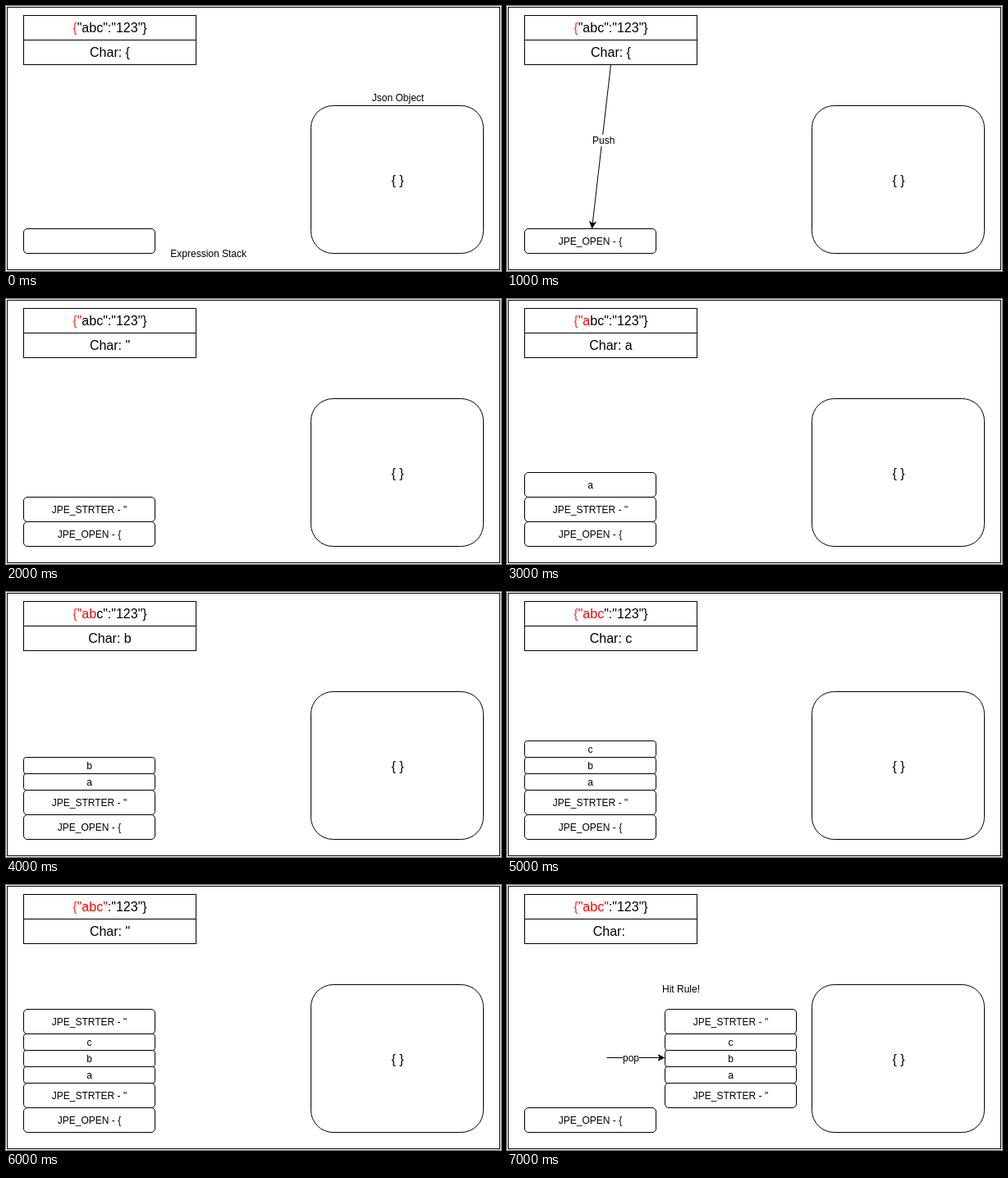
An HTML page for the animation above (8 s loop, 603 px wide and 323 px high).

```html
<!DOCTYPE html>
<html lang="en">
<head>
<meta charset="utf-8">
<title>Parser stack</title>
<style>
  html, body { margin: 0; width: 100%; height: 100%; overflow: hidden; background: #fff; }
  svg { display: block; }
  rect { fill: #fff; stroke: #000; }
  rect.gap { stroke: none; }
  line { stroke: #000; }
  text { font-family: "Liberation Sans", Helvetica, Arial, sans-serif; text-anchor: middle; }
</style>
</head>
<body>
<svg width="603" height="323" viewBox="0 0 603 323">
  <defs>
    <marker id="head" markerUnits="userSpaceOnUse" orient="auto" overflow="visible">
      <path d="M0 0L-7 3.5L-5.25 0L-7 -3.5Z" stroke="#000"/>
    </marker>
  </defs>
  <rect x="1.5" y="1.5" width="600" height="320"/>
  <g id="scene"></g>
</svg>
<script>
const STEP = 1000;
const SOURCE = '{"abc":"123"}';
const OPEN = ['JPE_OPEN - {', 30];
const QUOTE = ['JPE_STRTER - "', 30];
const letters = s => [...s].map(c => [c, 20]);

// read: characters consumed; stack: [label, height] from the bottom up
const steps = [
  { read: 1, char: '{', stack: [['', 30]], intro: true },
  { read: 1, char: '{', stack: [OPEN], push: true },
  { read: 2, char: '"', stack: [OPEN, QUOTE] },
  { read: 3, char: 'a', stack: [OPEN, QUOTE, ['a', 30]] },
  { read: 4, char: 'b', stack: [OPEN, QUOTE, ...letters('ab')] },
  { read: 5, char: 'c', stack: [OPEN, QUOTE, ...letters('abc')] },
  { read: 6, char: '"', stack: [OPEN, QUOTE, ...letters('abc'), QUOTE] },
  { read: 6, char: '', stack: [OPEN], popped: [QUOTE, ...letters('abc'), QUOTE] },
];

const text = (x, y, s, size = 12) => `<text x="${x}" y="${y}" font-size="${size}">${s}</text>`;

const box = (x, y, w, h, r = 0) =>
  `<rect x="${x}" y="${y}" width="${w}" height="${h}" rx="${r}"/>`;

const arrow = (x1, y1, x2, y2, label, lx, ly, w) =>
  `<line x1="${x1}" y1="${y1}" x2="${x2}" y2="${y2}" marker-end="url(#head)"/>` +
  `<rect class="gap" x="${lx - w / 2}" y="${ly - 11}" width="${w}" height="14"/>` +
  text(lx, ly, label);

function pile(x, bottom, items) {
  return items.map(([label, h]) => {
    bottom -= h;
    return box(x, bottom, 160, h, h * 0.15) + text(x + 80, bottom + h / 2 + 4.5, label);
  }).join('');
}

function header({ read, char }) {
  const code = `<tspan fill="#f33">${SOURCE[0]}</tspan>` +
    `<tspan fill="red">${SOURCE.slice(1, read)}</tspan>${SOURCE.slice(read)}`;
  return box(21.5, 11.5, 210, 30) + box(21.5, 41.5, 210, 30) +
    text(126.5, 32, code, 16) + text(126.5, 62, 'Char:\u00a0' + char, 16);
}

function draw(step) {
  let out = header(step) + box(371.5, 121.5, 210, 180, 27) +
    text(477, 218, '{ }', 16) + pile(21.5, 301.5, step.stack);
  if (step.intro) out += text(477.5, 116, 'Json Object') + text(246.7, 306, 'Expression Stack');
  if (step.push) out += arrow(126.5, 71.5, 103.6, 270.4, 'Push', 117.7, 168, 28);
  if (step.popped) {
    out += pile(192.5, 271.5, step.popped) + text(212, 131, 'Hit Rule!') +
      arrow(121.5, 210.5, 191.4, 210.5, 'pop', 151, 215, 20);
  }
  return out;
}

const scene = document.getElementById('scene');
let shown = -1;
function frame() {
  const i = Math.floor(performance.now() / STEP) % steps.length;
  if (i !== shown) scene.innerHTML = draw(steps[shown = i]);
  requestAnimationFrame(frame);
}
frame();
</script>
</body>
</html>
```
